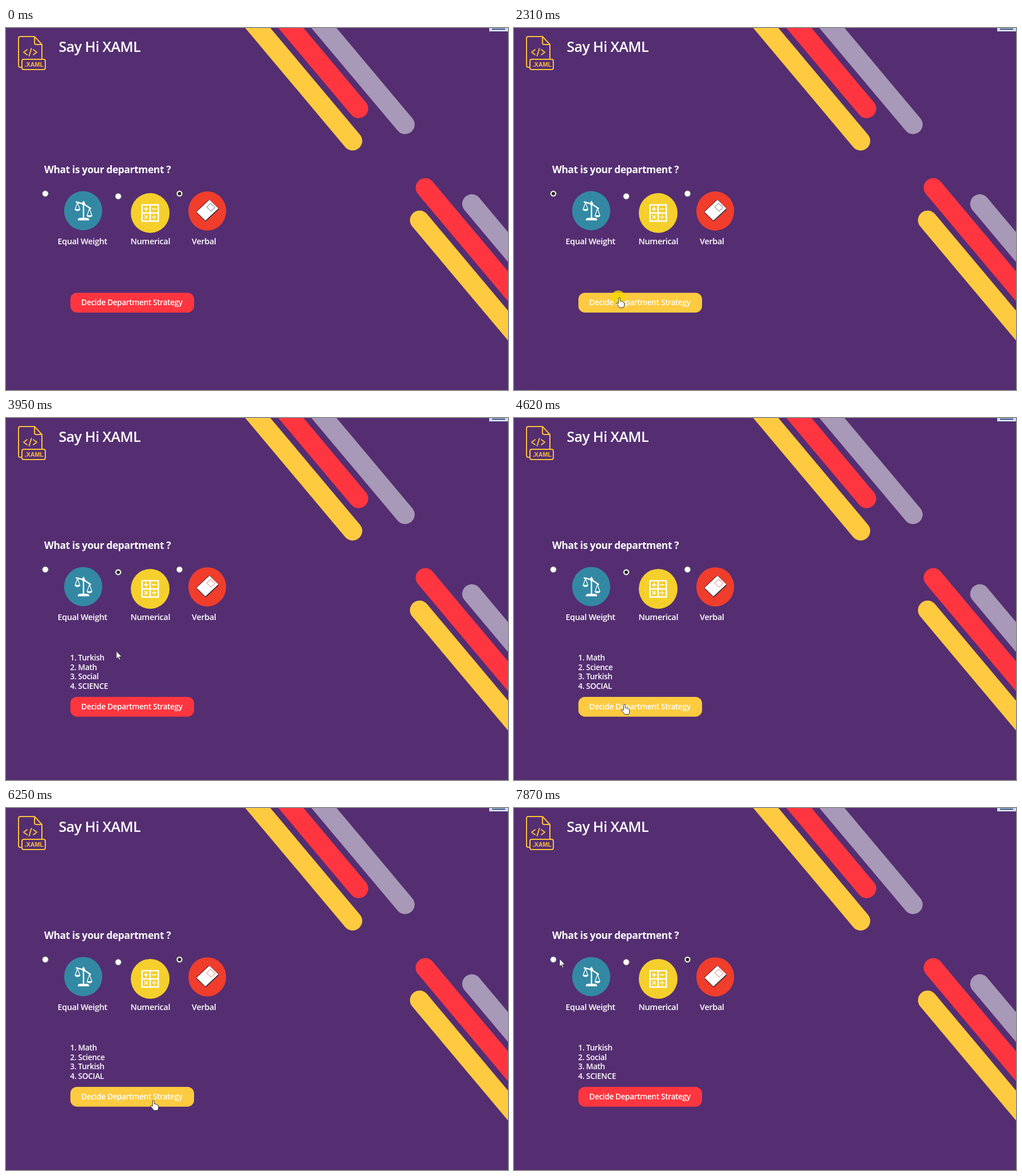
An HTML page that plays this animation: 881x636 px, repeating every 8 s.

```html
<!DOCTYPE html>
<html lang="en">
<head>
<meta charset="utf-8">
<title>Say Hi XAML</title>
<style>
  html, body { margin: 0; width: 100%; height: 100%; overflow: hidden; background: #542e71; }
  svg { display: block; }
  text { font: 600 13.6px "Open Sans", "Noto Sans", sans-serif; letter-spacing: -.024em; fill: #fff; }
  .bars { stroke-width: 33.8; stroke-linecap: round; }
  .line { fill: none; stroke: #fff; stroke-width: 2.4; }
  .gold { fill: none; stroke: #fcbf3a; stroke-width: 2; stroke-linejoin: round; stroke-linecap: round; }
  #labels text { font-size: 14.5px; }
</style>
</head>
<body>
<svg width="881" height="636" viewBox="0 0 881 636">
  <rect width="881" height="636" fill="#542e71"/>
  <g class="bars">
    <path stroke="#fdca40" d="M608.3 198.300l-210-250.300M725.800 337.700l210 250.300"/>
    <path stroke="#ff3640" d="M618.800 141.500l-210-250.300M735.800 280.700l210 250.300"/>
    <path stroke="#a799b7" d="M700.300 169.500l-210-250.300M817.500 309l210 250.300"/>
  </g>
  <rect x="848" width="33" height="6" fill="#cbdcf2"/>
  <path d="M853 2h23" stroke="#3f4d80" stroke-width="2"/>

  <g class="gold">
    <path d="M27 69h-2q-3 0-3-3V18q0-3 3-3h25l13 14v26M50 15v11q0 3 3 3h10"/>
    <rect x="28" y="55" width="41" height="18" rx="3"/>
    <path d="M37 38l-6 4.500 6 4.500M48 38l6 4.500-6 4.500M44.500 36l-4 13"/>
  </g>
  <text x="32.500" y="68" style="font:700 10.800px 'Liberation Sans',Arial,sans-serif;letter-spacing:0;fill:#fcbf3a">.XAML</text>
  <text x="92.500" y="42" style="font-size:25.200px">Say Hi XAML</text>

  <g id="form">
    <text x="67" y="254.700" style="font-size:17.500px;font-weight:700">What is your department ?</text>
    <g id="radios"></g>
    <ellipse cx="135.500" cy="321" rx="33.500" ry="34.500" fill="#3389a3"/>
    <ellipse cx="253" cy="325" rx="34" ry="35" fill="#f5cf2c"/>
    <ellipse cx="353.200" cy="321.500" rx="33.200" ry="34.500" fill="#f03d2c"/>

    <path class="line" d="M136 304v31M122.500 305.500l13.500 3.500 13 8.500"/>
    <path class="line" style="stroke-width:1.300" d="M125.500 307l-4 11M125.500 307l4 11M146.500 317l-4 12M146.500 317l4 12"/>
    <path fill="#fff" d="M120.300 318h10.400q-1 3.500-5.200 3.500t-5.200-3.500M141.300 329h10.400q-1 3.500-5.200 3.500t-5.200-3.500M126 338v-2q1-2.500 5-2.500h10q4 0 5 2.500v2z"/>
    <circle cx="136" cy="308.500" r="2.800" fill="#fff"/>

    <path class="line" d="M238.700 310.700h28.600v28.600h-28.600zM253 310.500v29M238.500 325h29"/>
    <path class="line" style="stroke-width:1.700" d="M242 318h8M246 314v8M256 318h8M243 329l6 6m0-6l-6 6M256 332h8M260 328v1.800M260 334.200v1.800"/>

    <path d="M334 324.500l16.500 15.500L373 319v-2z" fill="#2b2735"/>
    <path d="M334 323L357 301.500 373 317 350 338.500z" fill="#fff" stroke="#4c3038" stroke-width=".6"/>
    <path d="M334.500 322L356.500 301.500" stroke="#2b2735" stroke-width="1.600" stroke-dasharray="1.200 1.800"/>
    <path id="sticker" d="M352 314.500l7-6.500 8 7.500-7 6.500z" fill="none" stroke-width=".9"/>
    <g id="labels">
      <text x="90.500" y="380">Equal Weight</text>
      <text x="218.500" y="380">Numerical</text>
      <text x="326" y="380">Verbal</text>
    </g>
  </g>

  <g id="list"></g>
  <g id="button">
    <rect id="face" x="113" y="465.200" width="217" height="34.700" rx="11.500"/>
    <text x="132" y="487">Decide Department Strategy</text>
  </g>

  <g id="pointer">
    <circle id="glow" r="12" fill="#f5d800" opacity=".8"/>
    <path id="arrow" fill="#fff" stroke="#222" stroke-width=".8" d="M0 0v13.500l3-2.800 2.100 4.800 2-.9-2-4.600h4.300z"/>
    <path id="hand" fill="#fff" stroke="#222" stroke-width=".9" d="M.3 11V2.200a1.500 1.500 0 0 1 3 0V7q2.200-.8 3 .8 2-.5 2.600 1 1.600 0 1.600 2.200v3.500q-.5 2-1.500 3.800H2.500Q0 15-3 11.500q-.5-2 1.300-1.600 1 .3 2 1.100z"/>
  </g>
</svg>
<script>
const LOOP = 8000, SHIFT = 24.8;
const $ = id => document.getElementById(id);

const radios = [[69, 291], [197, 295.7], [304.5, 291]];
const lists = [
  [],
  ["Turkish", "Math", "Social", "SCIENCE"],
  ["Math", "Science", "Turkish", "SOCIAL"],
  ["Turkish", "Social", "Math", "SCIENCE"]
];
const listTimes = [2370, 4490, 6720];
const selectTimes = [1480, 3480, 5560];
const clicks = [[1420, 1540], [2310, 2440], [3420, 3550], [4350, 4490], [5500, 5630], [6600, 6720]];

// Pointer moves: start, end, x, y
const moves = [
  [200, 930, 73, 303], [960, 1020, 68, 299], [1180, 1280, 68, 286],
  [1600, 2170, 183, 473], [2440, 3070, 196, 279], [3130, 3280, 196, 271],
  [3600, 4220, 192, 502.5], [4650, 5230, 303, 263], [5680, 6250, 257, 513],
  [7040, 7070, 257, 510], [7240, 7640, 28, 251], [7660, 7870, 80, 265]
];

$("radios").innerHTML = radios.map(([x, y]) =>
  `<circle cx="${x}" cy="${y}" r="5.3" fill="#fff"/><circle cx="${x}" cy="${y}" r="3" fill="#222"/>`).join("");
const rings = [...$("radios").children].filter((c, i) => i % 2 === 0);
const dots = [...$("radios").children].filter((c, i) => i % 2);

const passed = (times, t) => times.filter(s => t >= s).length;
const show = (el, on) => el.setAttribute("visibility", on ? "visible" : "hidden");
const move = (el, x, y) => el.setAttribute("transform", `translate(${x} ${y})`);

function pointerAt(t) {
  let x = 608, y = 581;
  for (const [start, end, toX, toY] of moves) {
    const p = Math.min(1, Math.max(0, (t - start) / (end - start)));
    const k = p * p * (3 - 2 * p);
    x += (toX - x) * k;
    y += (toY - y) * k;
  }
  return [x, y];
}

let shownList = -1;
function draw(t) {
  const step = passed(listTimes, t), shift = step ? SHIFT : 0;
  const selected = [2, 0, 1, 2][passed(selectTimes, t)];
  const [x, y] = pointerAt(t), visible = t >= 200;
  const hover = visible && x > 113 && x < 330 && y > 465 + shift && y < 500 + shift;

  if (step !== shownList) {
    $("list").innerHTML = lists[step].map((name, i) =>
      `<text x="112.500" y="${426 + i * 16.5}">${i + 1}. ${name}</text>`).join("");
    shownList = step;
  }
  move($("form"), 0, -shift);
  move($("button"), 0, shift);
  $("face").setAttribute("fill", hover ? "#fdca40" : "#ff3640");
  $("sticker").setAttribute("stroke", step ? "#e0605a" : "#55505c");

  radios.forEach(([rx, ry], i) => {
    const near = visible && Math.hypot(x - rx, y - ry + shift) < 12;
    rings[i].setAttribute("stroke", near ? "#4561a8" : "#777");
    show(dots[i], i === selected);
  });

  move($("pointer"), x, y);
  show($("glow"), clicks.some(([a, b]) => t >= a && t < b));
  show($("arrow"), visible && !hover);
  show($("hand"), hover);
}

function frame() {
  draw(performance.now() % LOOP);
  requestAnimationFrame(frame);
}
frame();
</script>
</body>
</html>
```
